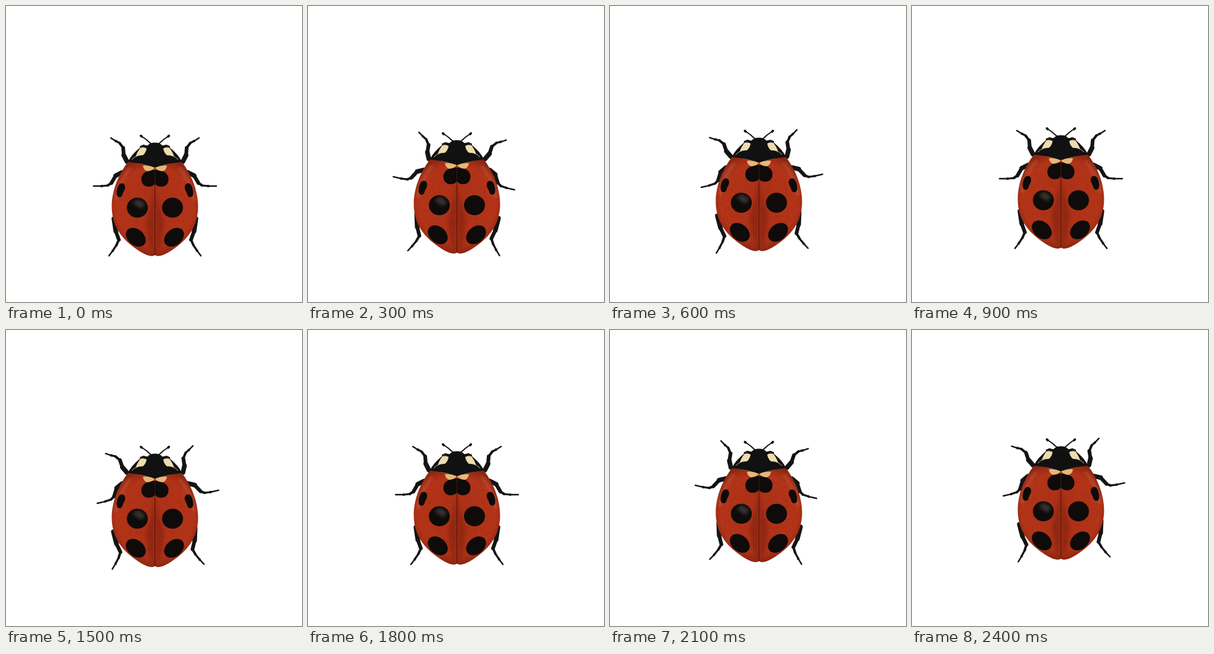
Animation, 480 px wide and 480 px high, one loop 2700 ms. Source, as an HTML page:

```html
<!DOCTYPE html>
<html lang="en">
<head>
<meta charset="utf-8">
<title>Walking ladybird</title>
<style>
html, body { margin: 0; width: 100%; height: 100%; overflow: hidden; background: #fff; }
svg { display: block; width: 100%; height: 100%; }
</style>
</head>
<body>
<svg viewBox="0 0 480 480">
  <defs>
    <radialGradient id="red" gradientUnits="userSpaceOnUse" cx="242" cy="325" r="84">
      <stop offset="0" stop-color="#aa3017"/>
      <stop offset=".75" stop-color="#b33418"/>
      <stop offset="1" stop-color="#842310"/>
    </radialGradient>
    <filter id="soft" x="-50%" y="-50%" width="200%" height="200%"><feGaussianBlur stdDeviation="2.5"/></filter>
    <path id="wing" d="M242 261C226 260 210 251 198 253C184 270 171.500 298 171.500 325C171.500 350 182 371 202 387C214 397 228 405.500 236 405.500Q241 405.500 242 402Z"/>
    <clipPath id="shell"><use href="#wing"/></clipPath>

    <g id="back">
      <use href="#wing" fill="url(#red)"/>
      <g clip-path="url(#shell)">
        <path fill="#741d0c" opacity=".45" filter="url(#soft)" d="M242 285L236 320L227 350L230 385L242 400Z"/>
        <path fill="none" stroke="#e38467" stroke-width="4" opacity=".4" filter="url(#soft)" d="M202 263Q183 283 178 315"/>
        <path id="grain" fill="none" stroke="#74200f" opacity=".3"/>
      </g>
      <g fill="#0e0b0a">
        <path d="M242 266C231 264 219.500 271 219.500 280C219.500 288 224 293 231 293C238 293 241 290 242 286Z"/>
        <ellipse cx="213" cy="327" rx="17" ry="16.300"/>
        <ellipse cx="210.500" cy="375" rx="18" ry="13" transform="rotate(40 210.500 375)"/>
        <path d="M184 289C190 285 194 290 193 296C192 300 190 301 189 306C187 312 180 311 179.500 305C179 299 181 292 184 289Z"/>
      </g>
    </g>

    <g id="front">
      <path fill="#eddcae" d="M218 230Q224 228 228 231Q227 238 222 242Q214 242 210 245Q213 236 218 230Z"/>
      <path fill="none" stroke="#c8b589" d="M210 244L204 249"/>
      <path fill="#e5b777" d="M222 259Q232 258 241 262Q239 267 229 268Q223 266 222 259Z"/>
      <g fill="none" stroke="#15110f" stroke-linecap="round">
        <path stroke-width="1.800" d="M235 223Q231 220 228 217L221 212"/>
        <path stroke-width="3.800" d="M218.800 210.500L220 211.700"/>
        <path stroke-width="2.200" d="M218 228L223 226L227 227"/>
      </g>
    </g>
  </defs>

  <g id="bug">
    <g id="legs" fill="none" stroke="#141414" stroke-linecap="round" stroke-linejoin="round"></g>
    <use href="#back"/><use href="#back" transform="translate(483) scale(-1 1)"/>
    <path fill="#66635e" opacity=".45" filter="url(#soft)" d="M205 319L214 313L226 321L219 329Z"/>
    <path stroke="#4d1408" d="M241.500 267V404"/>
    <path fill="#111" d="M197.500 253Q203 241 218 229Q225 226 230 226Q233 221.500 241.500 221.500Q250 221.500 253 226Q258 226 265 229Q280 241 285.500 253Q264 255 249 260Q241.500 264 234 260Q220 255 197.500 253Z"/>
    <use href="#front"/><use href="#front" transform="translate(483) scale(-1 1)"/>
  </g>
</svg>
<script>
const $ = id => document.getElementById(id);
const STEP = 300, STEPS = 9, RISE = 4.1;

// Left legs from hip to claw; each turns about its pivot, the right side mirrors them.
const legs = [
  { points: "196,252 191,242 190,230 184,222 178,219 170,214", pivot: "196 252", swing: 14 },
  { points: "188,270 178,275 171,287 165,291 155,292 142,292", pivot: "189 270", swing: 13 },
  { points: "175,345 178,365 183,379 179,388 173,397 167,405", pivot: "205 355", swing: 6 }
];
const widths = [7.5, 6, 4, 3.2, 2.4];

function legSvg({ points }) {
  const p = points.split(" ");
  return "<g>" + widths.map((w, i) => `<path stroke-width="${w}" d="M${p[i]}L${p[i + 1]}"/>`).join("")
    + `<path stroke-width="4" d="M${p[4]}h.1"/></g>`;
}

const side = legs.map(legSvg).join("");
$("legs").innerHTML = `<g>${side}</g><g transform="translate(483) scale(-1 1)">${side}</g>`;

let seed = 7;
const random = () => (seed = seed * 16807 % 2147483647) / 2147483647;
$("grain").setAttribute("d", Array.from({ length: 450 },
  () => `M${171 + random() * 70} ${255 + random() * 150}h1.5`).join(""));

function draw(ms) {
  const step = Math.floor(ms / STEP) % STEPS;
  const turn = Math.sin(step * 2 * Math.PI / 3) / Math.sin(Math.PI / 3);
  $("bug").setAttribute("transform", `translate(0 ${-Math.round(step * RISE)})`);
  [...$("legs").children].forEach((group, right) => legs.forEach((leg, i) => {
    const angle = leg.swing * turn * (right ? -1 : 1);
    group.children[i].setAttribute("transform", `rotate(${angle} ${leg.pivot})`);
  }));
}

const start = performance.now();
function tick() {
  draw(performance.now() - start);
  requestAnimationFrame(tick);
}
tick();
</script>
</body>
</html>
```
